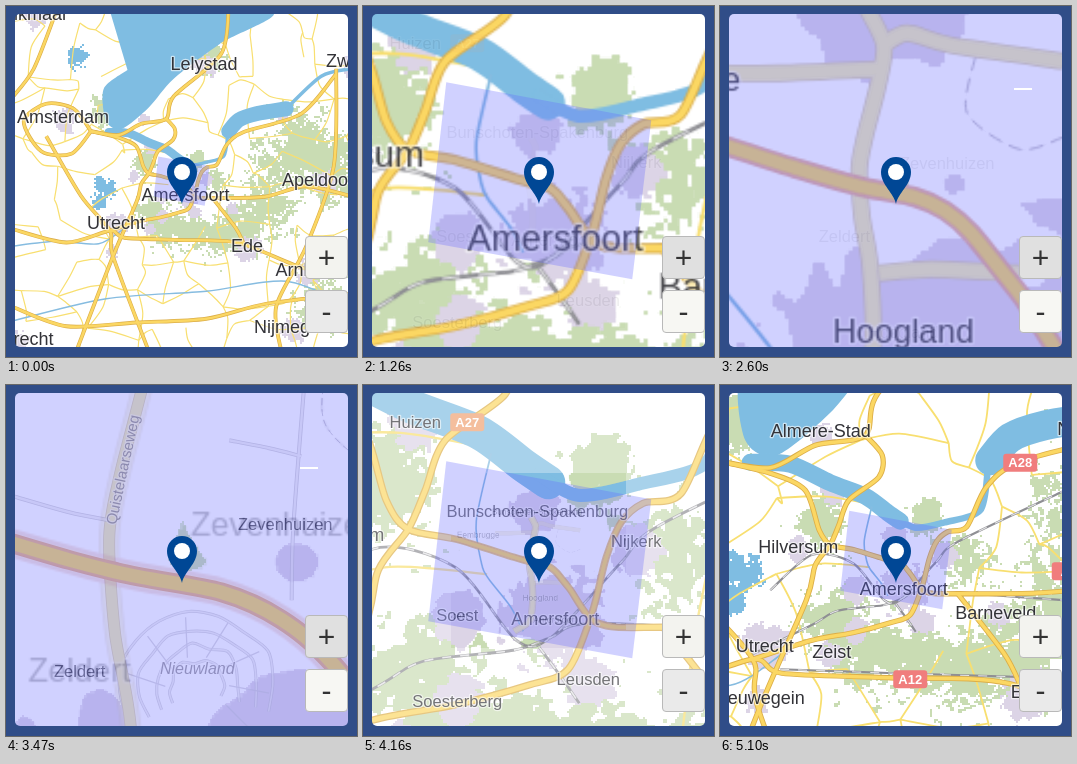
An HTML page with a canvas for the animation above (5370 ms loop, 351 px wide and 351 px high).

```html
<!DOCTYPE html>
<html lang="nl">
<head>
<meta charset="utf-8">
<title>Map zoom</title>
<style>
html, body { margin: 0; width: 100%; height: 100%; overflow: hidden; background: #304d88; }
canvas { position: absolute; left: 9px; top: 8px; border-radius: 5px; }
svg { position: absolute; left: 0; top: 0; }
.btn {
  position: absolute; left: 299px; width: 41px; height: 41px; border: 1px solid #b9b9b9;
  border-radius: 4px; color: #333; text-align: center;
  font: 30px/41px "Liberation Sans", Arial, sans-serif;
}
#plus { top: 230px; }
#minus { top: 284px; }
</style>
</head>
<body>
<canvas id="map" width="333" height="333"></canvas>
<svg width="351" height="351">
  <path id="dash" d="M294 83H312" stroke="#fff" stroke-width="2"/>
  <path d="M176 198C174 187 161 179 161 166A15 15 0 0 1 191 166C191 179 178 187 176 198Z" fill="#004795"/>
  <circle cx="176" cy="166" r="8" fill="#fff"/>
</svg>
<div class="btn" id="plus">+</div>
<div class="btn" id="minus">-</div>
<script>
const LOOP = 5370, SIZE = 351, MID = 175.25, LEVELS = 6;
const FONT = '"Liberation Sans", Arial, sans-serif';
const WATER = '#7fbde2', GREEN = '#c9dcb3', TOWN = '#dcd4e6';

// All places are offsets from the map centre, in pixels at level 2.
const scaleOf = level => 2 ** (level - 2);
const parse = text => text.split(' ').map(p => p.split(',').map(Number));

// [kind, first level, points]
const WAYS = [
  ['river', 0, '-680,260 -500,240 -330,250 -230,190'],
  ['river', 0, '-680,560 -300,470 100,440 420,400 680,500'],
  ['river', 1, '-47,-107 -62,-39 -57,2 -50,18 -28,46 -15,71'],
  ['border', 3, '20,-31 18,-17 31,-8 42,-11'],
  ['lane', 3, '-43,-27 -29,-27 -4,-28'],
  ['lane', 3, '-3,-34 3,-37 14,-34 42,-30'],
  ['lane', 3, '-4,23 9,22 31,23'],
  ['lane', 2, '-7,-43 -2.8,-34 -4.3,-24 -7.6,-11 -9,-3 -8.3,9 -6.3,21 -5.6,42 -9,61 -24,71'],
  ['street', 5, '15.3,-21 14,-4 13.8,5'],
  ['street', 5, '-21,-8 -14,-6 -9,-5'],
  ['street', 5, '6,-15 11,-14 15,-13'],
  ['rail', 1, '-250,60 -166,-11 -83,7 -22,80 13,77 83,2 125,-37 340,-140'],
  ['rail', 1, '-290,190 -166,129 -115,101 -25,90 13,77 65,63 340,80'],
  ['rail', 1, '1,87 23,117 41,143'],
  ['rail', 1, '-230,218 0,226 340,236'],
  ['motor', 0, '-361,-200 -250,-174 -180,-140 -152,-60 -130,-31 -82,-21 -24,-3 -8,1.5 5,4 12.5,7.4 19,13 31,28 60,63 125,67 334,62 498,20 680,60'],
  ['motor', 0, '-285,198 -166,160 -85,145 -10,125 30,109 54,52 68,-3 83,-38 105,-57 143,-67 182,-146 250,-197 480,-270 620,-430'],
  ['motor', 0, '-420,680 -273,300 -178,80 -160,10 -130,-31 -113,-70 -93,-120 -33,-166 -26,-210 -60,-250'],
  ['motor', 0, '-361,-200 -250,-185 -160,-230 -60,-250 -30,-340 160,-510 190,-700'],
  ['motor', 0, '-540,-180 -400,60 -285,198 -273,300 -130,680'],
  ['motor', 0, '-680,190 -460,245 -285,198 -227,226 -10,235 230,247 498,350 680,350'],
  ['motor', 0, '-680,500 -460,580 -180,565 100,550 340,490 680,450'],
  ['motor', 0, '620,-450 610,-60 500,260 380,500 400,680'],
  ['motor', 0, '125,67 218,187 250,250'],
  ['motor', 0, '-680,-330 -590,-450 -500,-680'],
  ['motor', 0, '-361,-200 -440,-110 -560,-120 -630,-240 -540,-310 -430,-290 -361,-200']
];

// [text, x, y, first level, last level, shield colour]
const LABELS = [
  ['Alkmaar', -585, -665, 0, 0], ['Lelystad', 91, -465, 0, 0], ['Zwolle', 683, -477, 0, 0],
  ['Amsterdam', -473, -253, 0, 0], ['Apeldoorn', 567, -1, 0, 0], ['Arnhem', 503, 359, 0, 0],
  ['Nijmegen', 443, 587, 0, 0], ['Dordrecht', -669, 635, 0, 0], ['Utrecht', -261, 173, 0, 1],
  ['Ede', 263, 265, 0, 1], ['Amersfoort', 17, 60, 0, 3], ['Almere-Stad', -149, -257, 1, 1],
  ['Hilversum', -194, -24, 1, 2], ['Barneveld', 201, 107, 1, 1], ['Zeist', -127, 185, 1, 1],
  ['Nieuwegein', -275, 277, 1, 1], ['Nunspeet', 401, -261, 1, 1], ['Huizen', -123, -137, 2, 2],
  ['Bunschoten-Spakenburg', -1, -48, 2, 3], ['Nijkerk', 98, -18, 2, 3], ['Soest', -81, 56, 2, 3],
  ['Leusden', 50, 120, 2, 2], ['Soesterberg', -81, 142, 2, 2], ['Eembrugge', -60, -25, 3, 3],
  ['Hoogland', 2, 38, 3, 4], ['Zevenhuizen', 13, -4.3, 4, 5], ['Zeldert', -12.7, 14, 4, 5],
  ['A28', 250, -195, 1, 1, '#f07d7d'], ['A12', 30, 238, 1, 1, '#f07d7d'],
  ['A1', 347, 22, 1, 1, '#f07d7d'], ['A27', -71, -138, 2, 2, '#efa06f']
];

// Centres and radii of ragged patches
const FORESTS = parse('460,-110,170 330,90,130 600,-60,150 260,180,110 -115,110,80 -60,190,90 60,200,80 '
  + '140,15,60 60,-88,36 -150,-90,50 -310,-300,70 150,230,90 120,-500,60 560,480,110');
const LAKES = parse('-310,20,45 -330,80,30 -420,-500,40');
const TOWNS = LABELS.filter(l => l[3] < 3 && !l[5])
  .map(([, x, y, first]) => [x, y, first ? 30 : 58])
  .concat(parse('16,28,22 2,-58,14 14,0,4'));

const LAKE_SHORE = '-285,-680 360,-680 155,-550 -30,-410 -130,-295 -237,-210 -300,-240 -310,-370 -215,-445';
// [width, points]
const CHANNELS = [
  [34, '-290,-196 -210,-192 -130,-155 -60,-128 -15,-95 10,-78'],
  [13, '0,-86 40,-65 100,-76 170,-100 185,-180'],
  [60, '190,-200 230,-245 300,-270 420,-290'],
  [14, '420,-290 560,-420 680,-450']
];
const ZONE = parse('-92,-99 113,-61 94,98 -110,61');

// [start, level, level shown scaled underneath]
const STEPS = [
  [0, 0], [550, 1, 0], [1260, 2, 1], [1930, 3, 2], [2600, 4, 3], [3270, 5, 4], [3960, 2, 3], [4630, 1, 2]
];

function hash(x, y) {
  const v = Math.sin(x * 127.1 + y * 311.7) * 43758.5453;
  return v - Math.floor(v);
}

function noise(x, y) {
  const ix = Math.floor(x), iy = Math.floor(y), u = x - ix, v = y - iy;
  const top = hash(ix, iy) * (1 - u) + hash(ix + 1, iy) * u;
  const low = hash(ix, iy + 1) * (1 - u) + hash(ix + 1, iy + 1) * u;
  return top * (1 - v) + low * v;
}

const ragged = (x, y) => [40, 20, 10, 5].reduce((sum, wave) => sum + noise(x / wave, y / wave) / 4, 0);

function inPatch(patches, x, y, rough) {
  return patches.some(([cx, cy, r]) => 1 - Math.hypot(x - cx, y - cy) / r + rough > 0.2);
}

function drawGround(g, scale) {
  const cell = 2;
  for (let py = 0; py < SIZE; py += cell) {
    for (let px = 0; px < SIZE; px += cell) {
      const x = (px - MID) / scale, y = (py - MID) / scale, rough = (ragged(x, y) - 0.5) * 3;
      const color = inPatch(LAKES, x, y, rough) ? WATER
        : inPatch(TOWNS, x, y, rough / 2) ? TOWN
        : inPatch(FORESTS, x, y, -rough) ? GREEN : null;
      if (!color) continue;
      g.fillStyle = color;
      g.fillRect(px, py, cell, cell);
    }
  }
}

// Smooth curve through every point
function trace(g, pts) {
  const at = i => pts[Math.max(0, Math.min(pts.length - 1, i))];
  g.beginPath();
  g.moveTo(...pts[0]);
  for (let i = 0; i < pts.length - 1; i++) {
    const [a, b, c, d] = [at(i - 1), at(i), at(i + 1), at(i + 2)];
    const bend = (p, q, r, sign) => [0, 1].map(k => q[k] + sign * (r[k] - p[k]) / 7);
    g.bezierCurveTo(...bend(a, b, c, 1), ...bend(b, c, d, -1), ...c);
  }
}

function stroke(g, pts, color, width, dash = []) {
  g.strokeStyle = color;
  g.lineWidth = width;
  g.setLineDash(dash);
  trace(g, pts);
  g.stroke();
}

// Country roads on a jittered grid
function drawNetwork(g, place, level) {
  const gap = 130;
  const node = (i, j) => [(i + hash(i, j) * 0.9) * gap, (j + hash(j, i + 9) * 0.9) * gap];
  const link = (a, b, seed) => {
    const mid = [0, 1].map(k => (a[k] + b[k]) / 2 + (hash(seed, k) - 0.5) * 45);
    stroke(g, [a, mid, b].map(place), '#f8df70', 1.2 + level * 0.6);
  };
  for (let i = -7; i < 7; i++) {
    for (let j = -7; j < 7; j++) {
      if (Math.hypot(i + 0.5, j + 0.5) < 1) continue;
      if (hash(i, j + 3) > 0.25) link(node(i, j), node(i + 1, j), i * 31 + j);
      if (hash(i + 5, j) > 0.25) link(node(i, j), node(i, j + 1), i * 17 - j);
    }
  }
}

// Rings of streets with spokes
function drawSuburb(g, place) {
  const polar = (r, a) => place([2 + r * Math.cos(a), 16 + r * Math.sin(a)]);
  for (let r = 3; r < 11; r += 2) {
    const ring = [];
    for (let a = 2.6; a < 6.9; a += 0.4) ring.push(polar(r + hash(r, a), a));
    stroke(g, ring, '#c4c3cc', 3);
    stroke(g, ring, '#ebe9ee', 1.6);
  }
  for (let a = 3.2; a < 6.8; a += 0.6) stroke(g, [polar(4, a), polar(9, a + 0.15)], '#cbc9d4', 1.3);
}

// Layers of one way: [colour, width, dash]
function wayStyle(kind, level) {
  const motor = 3.8 * 1.39 ** level, lane = 2.5 + level * 1.6;
  return {
    river: [['#86bce0', 1.4 + level * 0.2]],
    border: [['#bbb8c8', 1, [7, 4]]],
    street: [['#c0bec8', 4], ['#ebe9ee', 2.4]],
    lane: [['#d2c6a6', lane + 1.5], ['#f0eab4', lane]],
    rail: [['#8f8f94', 1.6 + level * 0.6], ['#e4e4e6', 0.6 + level * 0.5, [9, 9]]],
    motor: level < 3
      ? [['#dcae48', motor], ['#fbd763', motor * 0.66]]
      : [['#e2a592', motor], ['#f2d468', motor * 0.68]]
  }[kind];
}

function drawText(g, text, size, color, style = '') {
  g.font = `${style} ${size}px ${FONT}`;
  g.strokeStyle = 'rgba(255,255,255,.6)';
  g.lineWidth = 2.5;
  g.strokeText(text, 0, 0);
  g.fillStyle = color;
  g.fillText(text, 0, 0);
}

function drawLabel(g, [x, y], text, size, shield) {
  g.save();
  g.translate(x, y);
  if (shield) {
    g.fillStyle = shield;
    g.beginPath();
    g.roundRect(-17, -9, 34, 18, 3);
    g.fill();
    g.fillStyle = '#fff';
    g.font = `bold 13px ${FONT}`;
    g.fillText(text, 0, 1);
  } else drawText(g, text, size, '#333338');
  g.restore();
}

function drawStreetNames(g, place) {
  g.save();
  g.translate(...place([2, 13.6]));
  drawText(g, 'Nieuwland', 16, '#77737b', 'italic');
  g.restore();
  g.save();
  g.translate(...place([-7.2, -11.3]));
  g.rotate(-1.36);
  drawText(g, 'Quistelaarseweg', 15, '#77737b');
  g.restore();
}

function renderLevel(level) {
  const tile = document.createElement('canvas');
  tile.width = tile.height = SIZE;
  const g = tile.getContext('2d'), scale = scaleOf(level);
  const place = ([x, y]) => [MID + x * scale, MID + y * scale];
  const points = text => parse(text).map(place);
  g.fillStyle = '#fff';
  g.fillRect(0, 0, SIZE, SIZE);
  g.lineJoin = 'round';
  g.textAlign = 'center';
  g.textBaseline = 'middle';

  drawGround(g, scale);
  if (level < 3) drawNetwork(g, place, level);
  g.fillStyle = WATER;
  trace(g, points(LAKE_SHORE));
  g.fill();
  g.lineCap = 'round';
  for (const [width, text] of CHANNELS) stroke(g, points(text), WATER, width * scale);
  g.lineCap = 'butt';
  if (level === 5) drawSuburb(g, place);

  const shown = WAYS.filter(w => w[1] <= level);
  for (const kind of new Set(shown.map(w => w[0]))) {
    const ways = shown.filter(w => w[0] === kind).map(w => points(w[2]));
    for (const layer of wayStyle(kind, level)) ways.forEach(pts => stroke(g, pts, ...layer));
  }
  g.setLineDash([]);
  for (const [text, x, y, first, last, shield] of LABELS) {
    if (level >= first && level <= last) drawLabel(g, place([x, y]), text, first < 2 ? 18 : 16.5, shield);
  }
  if (level === 5) drawStreetNames(g, place);
  return tile;
}

const tiles = Array.from({ length: LEVELS }, (_, level) => renderLevel(level));
const view = document.getElementById('map').getContext('2d');
const plus = document.getElementById('plus'), minus = document.getElementById('minus');
const dash = document.getElementById('dash');

function drawZone(level) {
  const scale = scaleOf(level);
  view.fillStyle = 'rgba(100,105,255,.3)';
  view.beginPath();
  ZONE.forEach(([x, y]) => view.lineTo(MID + x * scale, MID + y * scale));
  view.fill();
}

function render(t) {
  const [start, level, under] = STEPS.findLast(s => s[0] <= t);
  const alpha = under === undefined ? 1 : Math.min(1, 0.08 + 0.2 * Math.floor((t - start) / 66));
  view.setTransform(1, 0, 0, 1, -9, -8);
  view.fillStyle = '#fff';
  view.fillRect(0, 0, SIZE, SIZE);
  if (alpha < 1) {
    const scale = scaleOf(level) / scaleOf(under), edge = MID * (1 - scale);
    view.drawImage(tiles[under], edge, edge, SIZE * scale, SIZE * scale);
  }
  view.globalAlpha = alpha;
  view.drawImage(tiles[level], 0, 0);
  view.globalAlpha = 1;
  drawZone(level);

  const onPlus = t >= 70 && t < 3700;
  const pressed = t >= 1930 && t < 1990;
  plus.style.background = pressed ? '#c9c9c9' : onPlus ? '#e0e0e0' : '#f3f3ef';
  minus.style.background = onPlus ? '#f7f7f3' : '#eaeaea';
  dash.style.display = t >= 1260 && t < 4630 ? '' : 'none';
}

const began = performance.now();
function tick() {
  render((performance.now() - began) % LOOP);
  requestAnimationFrame(tick);
}
tick();
</script>
</body>
</html>
```
